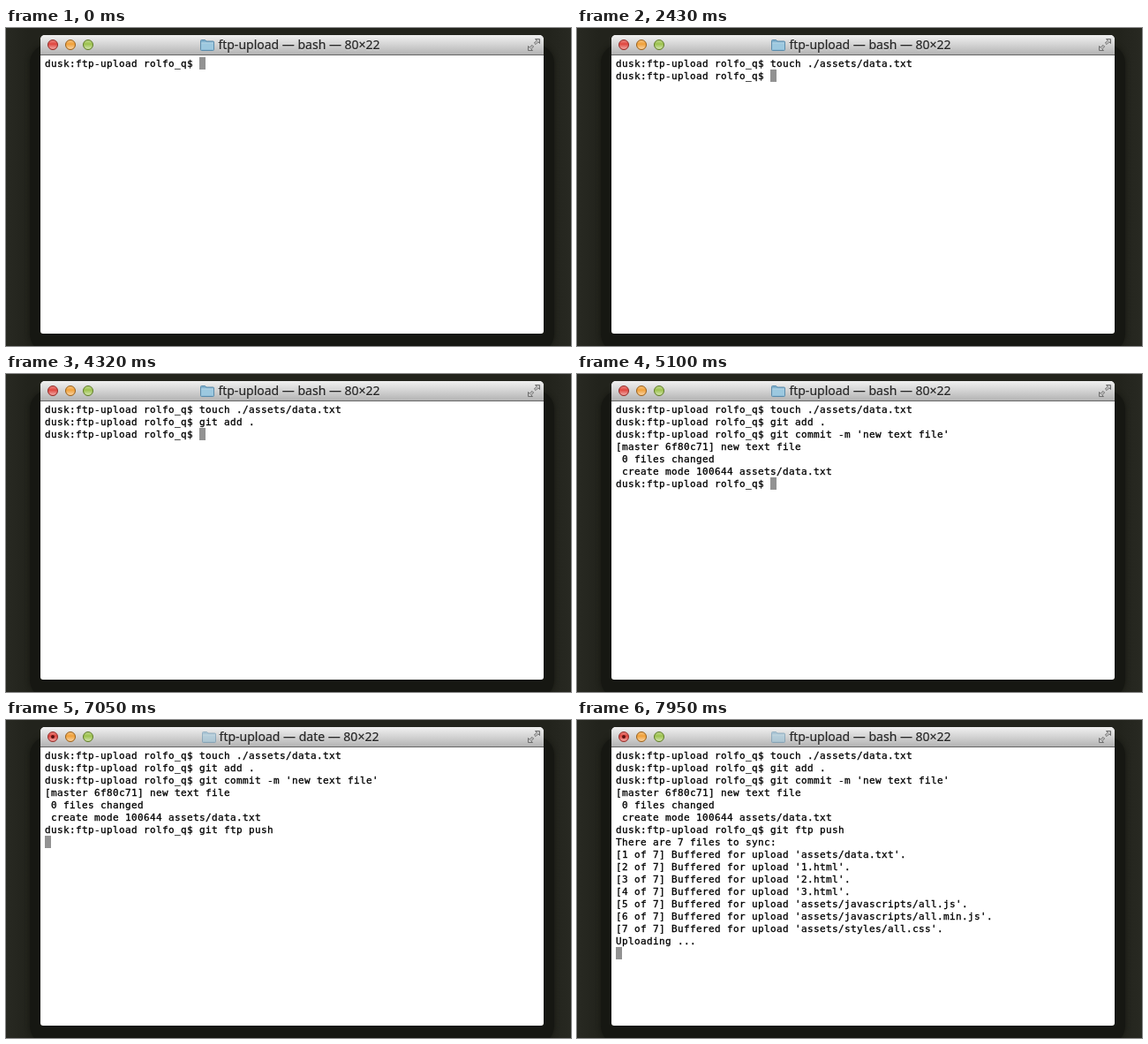
An HTML page for the animation above (8000 ms loop, 640 by 360 pixels).

```html
<!DOCTYPE html>
<html lang="en">
<head>
<meta charset="utf-8">
<title>Terminal</title>
<style>
html, body { margin: 0; width: 100%; height: 100%; overflow: hidden; background: #24251f; }
#stage { position: relative; width: 640px; height: 360px; overflow: hidden;
  background: linear-gradient(90deg, #282922, #22231c 26px, #22231c 614px, #282922); }
#shade { position: absolute; left: 27px; top: 18px; width: 594px; height: 350px;
  border-radius: 22px; background: #161712; box-shadow: 0 0 5px 1px #1a1b15; }
#window { position: absolute; left: 39px; top: 8px; width: 570px; height: 338px;
  border-radius: 5px 5px 3px 3px; background: #fff; overflow: hidden; }
#bar { position: relative; height: 22px; border-bottom: 1px solid #666;
  background: linear-gradient(#f0f0f0, #d6d6d6 45%, #b3b3b3); }
#bar svg { position: absolute; left: 0; top: 0; }
#title { position: absolute; left: 0; top: 0; width: 566px; height: 22px;
  display: flex; justify-content: center; align-items: center; gap: 4px;
  font: 14px/22px "Noto Sans", sans-serif; color: #262626; white-space: pre;
  -webkit-text-stroke: .2px; text-shadow: 0 1px rgba(255, 255, 255, .4); }
#bar #folder { position: static; }
#screen { position: absolute; left: 5px; top: 25px; margin: 0;
  font: 11px/14px "DejaVu Sans Mono", monospace; letter-spacing: calc(7px - 1ch);
  color: #000; -webkit-text-stroke: .3px; }
#text { position: relative; top: 1px; }
#cursor { display: inline-block; width: 7px; height: 14px; vertical-align: top; background: #929292; }
</style>
</head>
<body>
<div id="stage">
  <div id="shade"></div>
  <div id="window">
    <div id="bar">
      <svg width="570" height="22">
        <defs>
          <linearGradient id="gloss" x2="0" y2="1">
            <stop stop-color="#fff" stop-opacity=".35"/>
            <stop offset=".4" stop-color="#fff" stop-opacity="0"/>
            <stop offset="1" stop-color="#fff" stop-opacity=".55"/>
          </linearGradient>
        </defs>
        <g id="lights"></g>
        <circle id="busy" cx="14" cy="11" r="2" fill="#5c1110"/>
        <g fill="#c4c4c4" stroke="#6e6e6e">
          <path d="M560.500 4.500h5v5l-1.700-1.700-2.800 2.800-1.600-1.600 2.800-2.800z"/>
          <path d="M557.500 17.500h-5v-5l1.700 1.700 2.800-2.800 1.600 1.600-2.800 2.800z"/>
        </g>
      </svg>
      <div id="title">
        <svg id="folder" width="16" height="14">
          <path d="M.5 12.500V2.500q0-1 1-1h4l1.500 1.500h7.500q1 0 1 1v8.500q0 1-1 1h-13q-1 0-1-1z" fill="#7fb0cd" stroke="#5c8cab"/>
          <path d="M1 5.500h14v7H1z" fill="#9cc8df"/>
          <path d="M1 5h14" stroke="#c2e0ee"/>
        </svg>
        <span id="name"></span>
      </div>
    </div>
    <pre id="screen"><span id="text"></span><span id="cursor"></span></pre>
  </div>
</div>
<script>
const $ = id => document.getElementById(id);
const LOOP = 8000;
const prompt = 'dusk:ftp-upload rolfo_q$ ';

$('lights').innerHTML = [['#e0453e', '#8f302c'], ['#f0a038', '#96601f'], ['#9cc24c', '#5f7a2c']]
  .map(([fill, edge], i) => `<circle cx="${14 + 20 * i}" cy="11" r="5.500" fill="${fill}" stroke="${edge}"/>` +
    `<circle cx="${14 + 20 * i}" cy="11" r="4.800" fill="url(#gloss)"/>`).join('');

const files = ['assets/data.txt', '1.html', '2.html', '3.html',
  'assets/javascripts/all.js', 'assets/javascripts/all.min.js', 'assets/styles/all.css'];
const uploads = files.map((f, i) => `[${i + 1} of ${files.length}] Buffered for upload '${f}'.\n`).join('');

// Each step appends output; a job marks a running command and names its process.
const steps = [
  { at: 0, out: prompt },
  { at: 1350, out: 'touch ./assets/data.txt\n' + prompt },
  { at: 3150, out: 'git add .\n' + prompt },
  { at: 5100, out: "git commit -m 'new text file'\n[master 6f80c71] new text file\n" +
      ' 0 files changed\n create mode 100644 assets/data.txt\n' + prompt },
  { at: 7050, out: 'git ftp push\n', job: 'date' },
  { at: 7200, out: '', job: 'curl' },
  { at: 7950, out: `There are ${files.length} files to sync:\n${uploads}Uploading ...\n`, job: 'bash' }
];

let shown;
function draw(now) {
  const time = now % LOOP;
  const done = steps.filter(s => s.at <= time);
  if (done.length !== shown) {
    shown = done.length;
    const { job } = done[shown - 1];
    $('text').textContent = done.map(s => s.out).join('');
    $('name').textContent = `ftp-upload — ${job || 'bash'} — 80×22`;
    $('folder').style.opacity = job ? .55 : 1;
    $('busy').style.display = job ? '' : 'none';
  }
  requestAnimationFrame(() => draw(performance.now()));
}
draw(performance.now());
</script>
</body>
</html>
```
